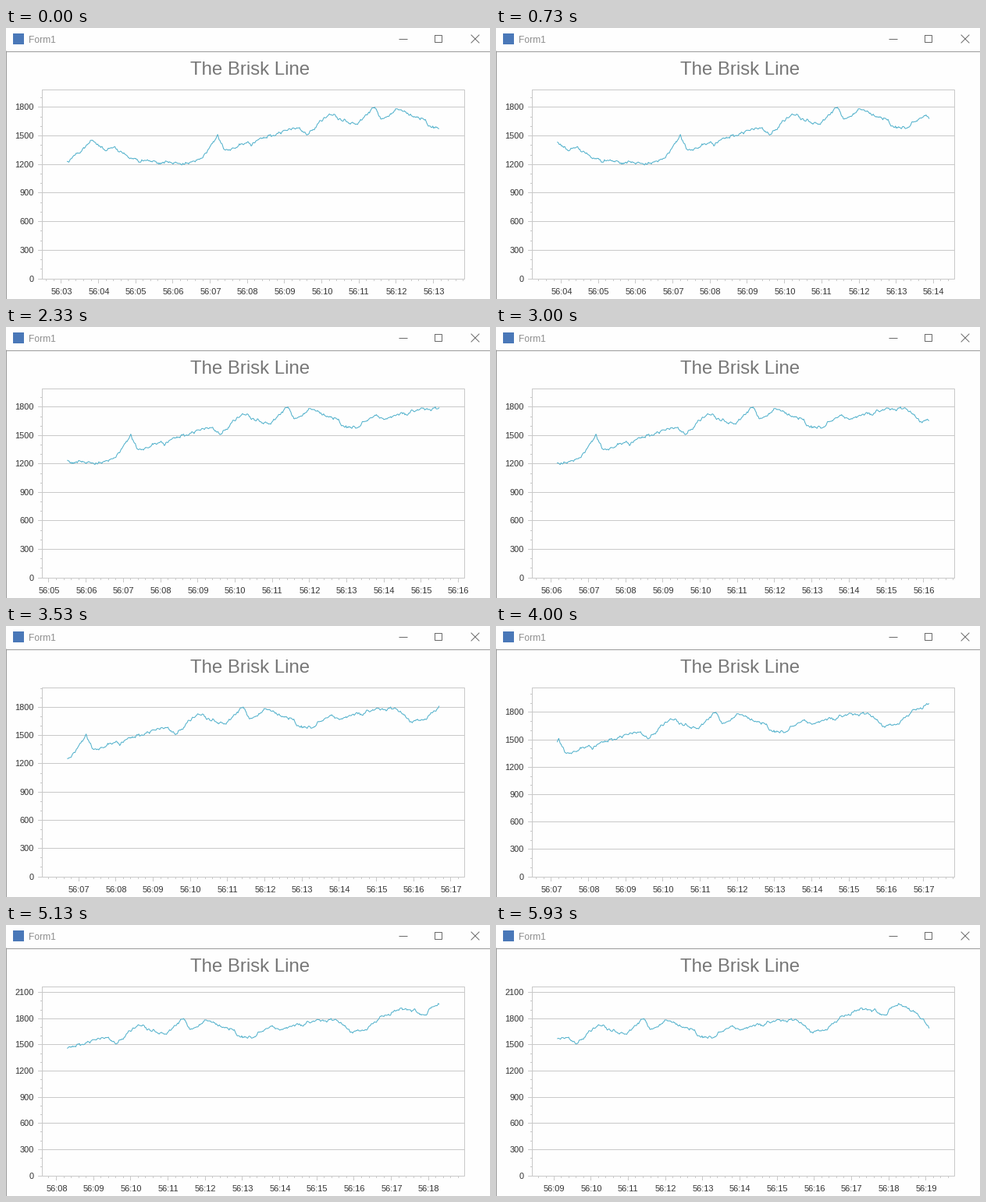
Animation of 620x348 px, one loop 6 s. Source, as a matplotlib script:

```python
import numpy as np
import matplotlib.pyplot as plt
from matplotlib.animation import FuncAnimation
from matplotlib.collections import LineCollection
from matplotlib.patches import Rectangle

W, H, DPI = 620, 348, 100
PX = 72 / DPI                      # one pixel in points
FRAMES, INTERVAL = 200, 30
REFRESH = 15                       # chart updates per second

LEFT, RIGHT, TOP, BOTTOM = 46, 587, 80, 322
HEAD_X, PX_PER_SEC, SPAN = 555.3, 47.68, 10
FIRST_HEAD = 13.16                 # newest sample, in clock seconds
BACK, GRID, EDGE, BUTTON, INK = "#fefefe", "#c9c9c9", "#9b9b9b", "#6b6b6b", "#333333"

plt.rcParams["font.family"] = "Liberation Sans"
plt.rcParams["path.snap"] = False

# Turning points of the signal: clock second, value
TURNS = [
    (3.2, 1240), (3.8, 1475), (4.2, 1335), (4.4, 1390), (4.9, 1255),
    (6.3, 1215), (6.8, 1275), (7.2, 1480), (7.4, 1365), (9.4, 1590),
    (9.6, 1510), (10.2, 1730), (10.9, 1620), (11.4, 1800), (11.6, 1675),
    (12.0, 1790), (12.7, 1695), (12.9, 1610), (13.3, 1600), (13.8, 1735),
    (14.0, 1690), (15.4, 1808), (15.9, 1650), (16.4, 1680), (16.7, 1830),
    (17.5, 1915), (17.9, 1855), (18.25, 1966), (18.8, 1855), (19.1, 1715),
]


def make_signal():
    """Times, noisy values and the highest trend value so far."""
    rng = np.random.default_rng(7)
    times = np.arange(3.1, 19.2, 0.02)
    trend = np.interp(times, *zip(*TURNS))
    wander = np.convolve(rng.normal(0, 8, times.size), 0.8 ** np.arange(20))
    return times, trend + wander[:times.size], np.maximum.accumulate(trend)


def pixel(v):
    """Centre of the pixel that holds v."""
    return np.floor(v) + 0.5


fig = plt.figure(figsize=(W / DPI, H / DPI), dpi=DPI, facecolor=BACK)
ax = fig.add_axes([0, 0, 1, 1])
ax.set_xlim(0, W)
ax.set_ylim(H, 0)
ax.axis("off")


def line(xs, ys, color, **style):
    return ax.plot(xs, ys, color=color, lw=PX, **style)[0]


def box(left, top, right, bottom, color):
    line([left, right, right, left, left], [top, top, bottom, bottom, top],
         color, solid_joinstyle="miter")


def label(x, y, text, size, color, ha):
    return ax.text(x, y, text, fontsize=size * PX, color=color, ha=ha,
                   va="baseline")


# Window frame
ax.add_patch(Rectangle((9, 7), 14, 14, color="#4a78b8", lw=0))
label(29, 19, "Form1", 12, "#8e8e8e", "left")
line([504, 514], [14.5, 14.5], BUTTON)
box(549.5, 9.5, 558.5, 18.5, BUTTON)
line([596, 606], [9, 19], BUTTON)
line([596, 606], [19, 9], BUTTON)
line([0, W], [30.5, 30.5], EDGE)
line([0.5, 0.5], [30, H], EDGE)

# Chart
label(312.5, 60, "The Brisk Line", 24, "#777777", "center")
grid = LineCollection([], colors=GRID, linewidths=PX, zorder=1)
ax.add_collection(grid, autolim=False)
box(LEFT + 0.5, TOP - 0.5, RIGHT + 0.5, BOTTOM + 0.5, GRID)
curve = line([], [], "#4fb0cb", zorder=3)
y_labels = [label(36, 0, str(300 * i), 11, INK, "right") for i in range(8)]
x_labels = [label(0, 342, "", 11, INK, "center") for _ in range(12)]

times, values, records = make_signal()


def update(frame):
    # Hold each refresh until the next one is nearly due
    refresh = (frame * INTERVAL + 25) * REFRESH // 1000
    head = FIRST_HEAD + refresh / REFRESH
    seen = (times >= head - SPAN) & (times <= head)
    top = 1.1 * records[seen][-1]

    def to_x(s):
        return HEAD_X + (s - head) * PX_PER_SEC

    def to_y(v):
        return BOTTOM - v / top * (BOTTOM - TOP)

    segments = []
    for v in range(0, int(top) + 1, 100):
        y = pixel(to_y(v))
        major = v % 300 == 0
        segments.append([(LEFT - (5 if major else 2), y),
                         (RIGHT if major else LEFT, y)])
    for i, text in enumerate(y_labels):
        text.set_visible(300 * i <= top)
        text.set_y(np.floor(to_y(300 * i)) + 4)

    first = head - (HEAD_X - LEFT) / PX_PER_SEC
    last = head + (RIGHT + 0.5 - HEAD_X) / PX_PER_SEC
    for fifth in range(int(np.ceil(first * 5)), int(np.floor(last * 5)) + 1):
        x = pixel(to_x(fifth / 5))
        size = 5 if fifth % 5 == 0 else 2
        segments.append([(x, BOTTOM + 1), (x, BOTTOM + 1 + size)])
    grid.set_segments(segments)

    for second, text in enumerate(x_labels, int(np.ceil(first))):
        text.set_visible(second <= last)
        text.set_text(f"56:{second:02d}")
        text.set_x(np.round(to_x(second)))

    curve.set_data(to_x(times[seen]), to_y(values[seen]))
    return [grid, curve, *y_labels, *x_labels]


anim = FuncAnimation(fig, update, frames=FRAMES, interval=INTERVAL,
                     repeat=True, repeat_delay=0, blit=False)
plt.show()
```
